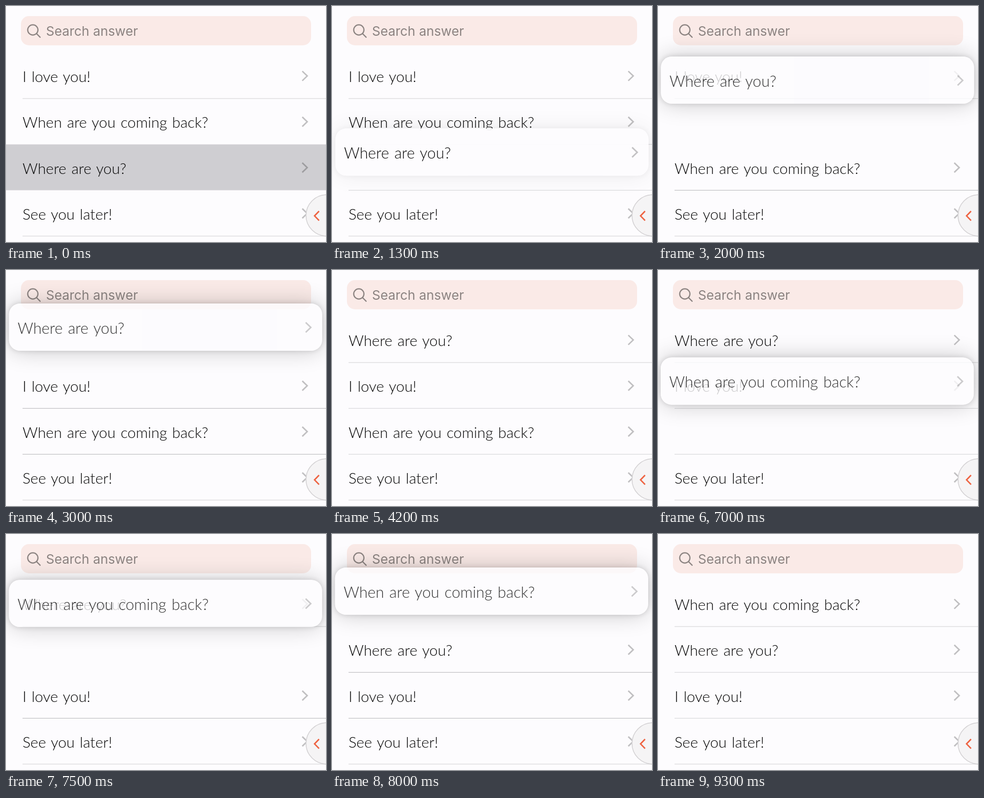
These frames come from a looping animation (600 px wide and 444 px high, 9500 ms). An HTML page:

```html
<!DOCTYPE html>
<html lang="en">
<head>
<meta charset="utf-8">
<title>Reorder answers</title>
<style>
  html, body { margin: 0; width: 100%; height: 100%; overflow: hidden; background: #fdfcfe; }
  svg { display: block; width: 100vw; height: 100vh; }
  .label { font: 300 28px Lato, "Open Sans", sans-serif; word-spacing: 2px; fill: #050505; }
  .search { font: 400 24.5px Inter, Roboto, sans-serif; fill: #8b8381; }
  .chevron { fill: none; stroke: #000; stroke-opacity: .24; stroke-width: 2.7; }
</style>
</head>
<body>
<svg id="stage" viewBox="0 0 600 444">
  <defs>
    <filter id="soft" filterUnits="userSpaceOnUse" x="-100" y="-100" width="800" height="644">
      <feGaussianBlur in="SourceAlpha" stdDeviation="22" result="wide"/>
      <feGaussianBlur in="SourceAlpha" stdDeviation="5" result="tight"/>
      <feComponentTransfer in="wide" result="w"><feFuncA type="linear" slope=".21"/></feComponentTransfer>
      <feComponentTransfer in="tight" result="n"><feFuncA type="linear" slope=".15"/></feComponentTransfer>
      <feMerge result="both"><feMergeNode in="w"/><feMergeNode in="n"/></feMerge>
      <feComposite in="both" in2="SourceAlpha" operator="out"/>
    </filter>
  </defs>
  <rect width="600" height="444" fill="#fdfcfe"/>
  <rect x="28" y="19" width="544" height="55" rx="15" fill="#faeae7"/>
  <g fill="none" stroke="#8b8381" stroke-width="2.2" stroke-linecap="round">
    <circle cx="50.3" cy="45" r="9.6"/>
    <path d="M57.3 52 L64 58.8"/>
  </g>
  <text class="search" x="75" y="56">Search answer</text>
  <rect id="press" width="600" height="86.2" fill="#cfced2"/>
  <g id="rows"></g>
  <g id="shadow"><rect id="shade" rx="20" fill="#000" filter="url(#soft)"/></g>
  <g id="card"></g>
  <circle cx="601.5" cy="394" r="39" fill="#f5f4f5" stroke="#d3d1d3" stroke-width="1.5"/>
  <path d="M587 386 L578.5 394.8 L587 403.6" fill="none" stroke="#ee6240" stroke-width="2.6"/>
</svg>
<script>
const LOOP = 9500, STEP = 100, TOP = 88, PITCH = 86.2, MID = 300.4, CARD_W = 570, GROW = 1.03;
const labels = ["I love you!", "When are you coming back?", "Where are you?", "See you later!"];

// Each drag takes the third row to the top; the rows it passes slide down.
const drags = [
  { order: [0, 1, 2, 3], press: 0, lift: 200, move: 1200, hold: 2600, drop: 3000, done: 3700, slides: [1600, 2080] },
  { order: [2, 0, 1, 3], press: 6000, lift: 6200, move: 6640, hold: 8000, drop: 8300, done: 8900, slides: [7080, 7520] }
];
const FROM = 2, SLIDE = 350;

const $ = id => document.getElementById(id);
const mix = (a, b, k) => a + (b - a) * k;
const part = (t, a, b) => Math.min(1, Math.max(0, (t - a) / (b - a)));
const smooth = k => k * k * (3 - 2 * k);
const easeOut = (k, p) => 1 - Math.pow(1 - k, p);
const center = slot => TOP + PITCH * (slot + .5);

function add(parent, tag, attrs, text = "") {
  const el = document.createElementNS("http://www.w3.org/2000/svg", tag);
  set(el, attrs);
  el.textContent = text;
  return parent.appendChild(el);
}
function set(el, attrs) {
  for (const key in attrs) el.setAttribute(key, attrs[key]);
}
function addContent(parent, label) {
  const text = add(parent, "text", { class: "label", x: 31, y: 12 }, label);
  add(parent, "path", { class: "chevron", d: "M555.5 -8.5 L564.8 .5 L555.5 9.5" });
  return text;
}

const rows = labels.map(label => {
  const g = add($("rows"), "g", {});
  const body = add(g, "g", {});
  addContent(body, label);
  const line = add(g, "path", { d: `M31 ${PITCH / 2} H600`, "stroke-width": 1.2 });
  return { g, body, line };
});
const plate = add($("card"), "rect", {
  x: MID - CARD_W / 2, y: -PITCH / 2, width: CARD_W, height: PITCH, rx: 20, fill: "#fdfcfe"
});
const cardText = addContent($("card"), "");

function placeRow(id, slot, tint = 0, line = 1, body = 1) {
  const { g, body: b, line: l } = rows[id];
  const shade = Math.round(mix(219, 196, tint));
  set(g, { transform: `translate(0 ${center(slot)})` });
  set(b, { opacity: body });
  set(l, { stroke: `rgb(${shade},${shade},${shade + 2})`, opacity: line });
}

function draw(t) {
  const d = t < drags[1].press ? drags[0] : drags[1];
  const active = t < d.done;
  const lift = smooth(part(t, d.lift, d.lift + 400));
  const carry = smooth(part(t, d.move, d.move + 300));
  const travel = easeOut(part(t, d.move, d.hold), 2.14);
  const drop = easeOut(part(t, d.drop, d.done), 3);
  const up = 1 - drop;

  d.order.forEach((id, slot) => {
    if (slot === FROM) {
      const opened = t >= d.slides[0];
      const line = opened ? drop : lift;
      placeRow(id, opened ? 0 : FROM, 0, line, active ? 0 : 1);
    } else if (slot < FROM) {
      const start = d.slides[FROM - 1 - slot];
      const k = smooth(part(t, start, start + SLIDE));
      placeRow(id, slot + k, k * up, slot === FROM - 1 ? mix(1 - (lift ? 0 : 1), 1, k) : 1);
    } else {
      placeRow(id, slot);
    }
  });

  set($("press"), { y: TOP + PITCH * FROM, opacity: active ? 1 - lift : 0 });

  const x = MID + (-2.4 * carry + 1.2 * travel) * up;
  const y = mix(mix(center(FROM), 107.5, travel), center(0), drop);
  const scale = 1 + (GROW - 1) * lift * up;
  const w = CARD_W * scale, h = PITCH * scale;
  const show = active ? "inline" : "none";
  cardText.textContent = labels[d.order[FROM]];
  set(plate, { opacity: lift });
  set($("card"), {
    display: show,
    opacity: 1 - .2 * carry * up,
    transform: `translate(${x} ${y}) scale(${scale}) translate(${-MID} 0)`
  });
  set($("shade"), { x: x - w / 2, y: y - h / 2, width: w, height: h });
  set($("shadow"), { display: show, opacity: mix(.12 * lift, 1, carry) * up });
}

const begin = performance.now();
function tick() {
  const t = (performance.now() - begin) % LOOP;
  draw(Math.floor(t / STEP) * STEP);
  requestAnimationFrame(tick);
}
tick();
</script>
</body>
</html>
```
